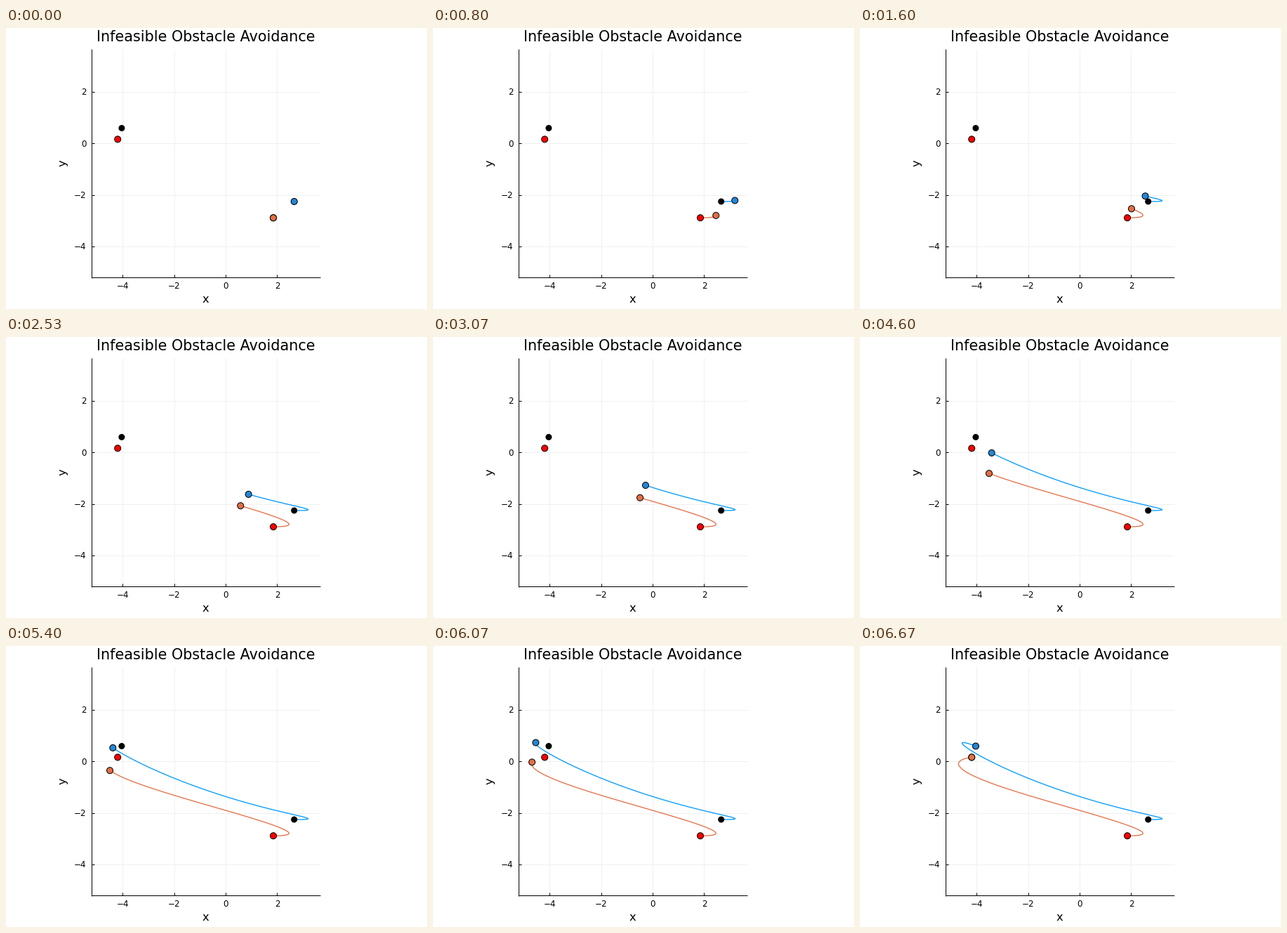
Animation, 600 px wide and 400 px high, one loop 6740 ms. Source, as a matplotlib script:

```python
import numpy as np
import matplotlib.pyplot as plt
from matplotlib.animation import FuncAnimation
from matplotlib.patches import Circle

W, H, DPI = 600, 400, 100
PX = 72 / DPI                     # points per pixel
LOOP, TICK = 6740, 20             # ms
FPS, LAST = 15, 100               # the agents take 100 steps at 15 per second

plt.rcParams["font.family"] = "DejaVu Sans"
fig = plt.figure(figsize=(W / DPI, H / DPI), dpi=DPI, facecolor="white")
ax = fig.add_axes([0, 0, 1, 1])
ax.set(xlim=(0, W), ylim=(H, 0))
ax.axis("off")


def segment(x, y, color="black", z=2):
    ax.plot(x, y, color=color, lw=PX, zorder=z, solid_capstyle="butt")


def label(x, y, text, size, **kw):
    ax.text(x, y, text, fontsize=size * PX, va="baseline", **kw)


def dot(xy, color, z, edge=1.0):
    return ax.add_patch(
        Circle(xy, 4.5, fc=color, ec="black", lw=edge * PX, zorder=z))


def smooth_path(points):
    """Polynomial motion near the key points, pinned at both ends."""
    weights = [9] + [1] * (len(KEY_STEPS) - 2) + [9]
    fit = np.polyfit(KEY_STEPS / LAST, points, 6, w=weights)
    t = np.linspace(0, 1, LAST + 1)
    return np.column_stack([np.polyval(c, t) for c in fit.T])


# Axes, grid and labels
left, right, top, bottom = 122, 447.5, 30, 355
unit, x0, y0 = 36.68, 313.1, 164.4
for v in (-4, -2, 0, 2):
    gx, gy = x0 + v * unit, y0 - v * unit
    name = str(v).replace("-", "\u2212")
    segment([gx, gx], [top, bottom], "#f0f0f0", 1)
    segment([left, right], [gy, gy], "#f0f0f0", 1)
    segment([gx, gx], [bottom, bottom - 4])
    segment([left, left + 4], [gy, gy])
    label(gx, 371.3, name, 11.9, ha="center")
    label(114.7, gy + 4.3, name, 11.9, ha="right")
segment([left, left], [top, bottom + 1])
segment([left, right], [bottom, bottom])
label(284.5, 19, "Infeasible Obstacle Avoidance", 20.8, ha="center")
label(284.6, 391, "x", 16.3, ha="center")
label(85.3, 192.6, "y", 16.3, ha="center", rotation=90, rotation_mode="anchor")

# Key points of the two agents, in pixels
KEY_STEPS = np.array([0, 11, 24, 38, 54, 69, 81, 88, 100])
blue = smooth_path([
    (410.7, 247.0), (430.5, 245.8), (406.6, 239.2), (345.6, 224.0), (259.4, 195.8),
    (187.6, 165.0), (152.3, 144.9), (145.5, 138.5), (164.9, 142.5)])
orange = smooth_path([
    (381.0, 270.2), (403.0, 267.4), (387.0, 257.2), (334.2, 240.3), (253.9, 216.8),
    (183.9, 194.1), (148.1, 177.3), (140.5, 168.5), (159.2, 158.4)])

agents = []
for path, line_color, dot_color, end_color, edge in (
        (blue, "#009afa", "#2586d6", "black", 0),
        (orange, "#e26f46", "#e26f46", "red", 1)):
    trail, = ax.plot([], [], color=line_color, lw=1.3 * PX, zorder=3)
    dot(path[0], end_color, 4, edge)
    dot(path[-1], end_color, 4, edge)
    agents.append((path, trail, dot(path[0], dot_color, 5)))


def draw(k):
    step = min(LAST, int((k * TICK + 15) * FPS / 1000))
    for path, trail, head in agents:
        trail.set_data(*path[:step + 1].T)
        head.center = path[step]
    return [artist for agent in agents for artist in agent[1:]]


anim = FuncAnimation(fig, draw, frames=LOOP // TICK, interval=TICK,
                     repeat=True, repeat_delay=0)
plt.show()
```
